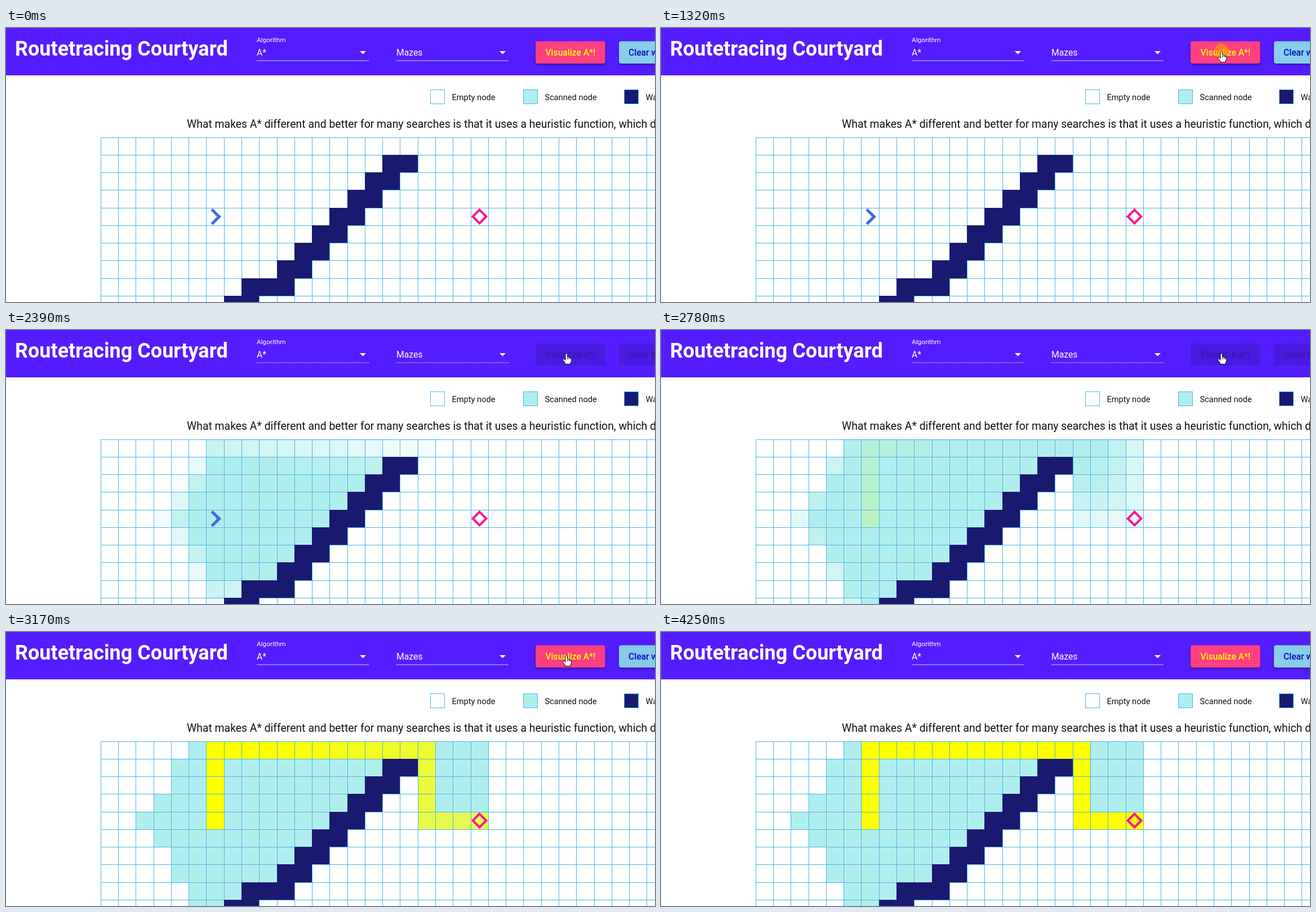
An HTML page with a canvas that plays this animation: 1152 px wide and 486 px high, repeating every 4.78 s.

```html
<!DOCTYPE html>
<html lang="en">
<head>
<meta charset="utf-8">
<title>Routetracing Courtyard</title>
<style>
  html, body { margin: 0; overflow: hidden; background: #fff; }
  canvas { display: block; }
</style>
</head>
<body>
<canvas id="stage" width="1152" height="486"></canvas>
<script>
const ctx = document.getElementById('stage').getContext('2d');
const LOOP = 4780, SCAN = 1490, SCAN_STEP = 11.3, PATH = 2710, PATH_STEP = 9, FADE = 400;
const ENABLE = 2930, SHOW = 380, ARRIVE = 920, PRESS = 1320, LEAVE = 3600, GONE = 4180;
const HEADER = [84, 29, 255], WHITE = [255, 255, 255], SCANNED = [175, 238, 238], YELLOW = [255, 255, 0];
const DISABLED = [74, 26, 224], LINE = '#4db4e6', NAVY = '#191970';

const clamp = v => Math.min(1, Math.max(0, v));
const mix = (a, b, t) => a.map((v, i) => v + (b[i] - v) * t);
const rgb = c => `rgb(${c.map(Math.round)})`;
const gridX = c => Math.floor(168.2 + 31.28 * c);
const gridY = r => Math.floor(194 + 31.28 * r);

const wallStart = r => r === 0 ? 18 : r < 8 ? 17 - r : 16 - r;

// A* with a straight-line heuristic: cells are visited in order of cost + distance.
const scanned = [];
for (let r = 0; r < 10; r++) {
  for (let c = 0; c < 22; c++) {
    const right = c > 17 && r < 5;
    if (!right && c >= wallStart(r)) continue;
    const cost = Math.abs(c - 6) + (right ? 4 + r : Math.abs(r - 4));
    const total = cost + Math.hypot(21 - c, r - 4);
    if (total < 23.001) scanned.push({ r, c, total });
  }
}
scanned.sort((a, b) => a.total - b.total || a.r - b.r);

const route = [];
for (let r = 4; r > 0; r--) route.push([r, 6]);
for (let c = 6; c < 18; c++) route.push([0, c]);
for (let r = 0; r < 4; r++) route.push([r, 18]);
for (let c = 18; c < 22; c++) route.push([4, c]);
const routeIndex = new Map(route.map(([r, c], i) => [r * 100 + c, i]));

const chevron = new Path2D('M366.9 320l-3.5 3.5 11.2 11.2-11.2 11.2 3.5 3.5 15.2-14.7z');
const hand = new Path2D('M-2 2Q-.3-1 1.5 2V7Q3.4 6 4.4 8Q6 7 7 9Q8.8 8.7 8.8 11V14L7 17V19.5H-2.5V17.5L-6.5 12Q-6.6 9.6-4.3 10.4L-2 12.5Z');
const arrow = new Path2D('M0 0V16L3.7 12.6 6.3 18.5 8.7 17.4 6.2 11.7H11.3Z');

function rect(x, y, w, h, color) {
  ctx.fillStyle = color;
  ctx.fillRect(x, y, w, h);
}

function text(str, x, y, size, color, weight = 400) {
  ctx.font = `${weight} ${size}px Roboto, sans-serif`;
  ctx.fillStyle = color;
  ctx.fillText(str, x, y);
}

function select(x, label, disabled) {
  text(label, x, 49, 15.7, '#fff');
  ctx.fillStyle = '#fff';
  ctx.beginPath();
  ctx.moveTo(x + 183, 41);
  ctx.lineTo(x + 194, 41);
  ctx.lineTo(x + 188.5, 46.5);
  ctx.fill();
  ctx.strokeStyle = '#a5e6e8';
  ctx.setLineDash(disabled ? [2.7, 1.4] : []);
  ctx.beginPath();
  ctx.moveTo(x, 58);
  ctx.lineTo(x + 199, 58);
  ctx.lineWidth = 1.2;
  ctx.stroke();
  ctx.setLineDash([]);
}

function button(x, w, label, textX, color, ink, on, disabled) {
  ctx.save();
  ctx.shadowColor = `rgba(0,0,0,${0.4 * on})`;
  ctx.shadowBlur = 4;
  ctx.shadowOffsetY = 2;
  ctx.fillStyle = rgb(mix(DISABLED, color, on));
  ctx.beginPath();
  ctx.roundRect(x, 23.5, w, 39.5, 4);
  ctx.fill();
  ctx.restore();
  text(label, textX, 49, 15.6, disabled ? '#3c16b8' : ink, 500);
}

function header(t) {
  const disabled = t >= SCAN && t < ENABLE;
  const ease = from => 1 - (1 - clamp((t - from) / 400)) ** 4;
  const on = t < ENABLE ? 1 - ease(SCAN) : ease(ENABLE);
  rect(0, 0, 1152, 84, rgb(HEADER));
  text('Routetracing Courtyard', 16, 49, 36, '#fff', 700);
  text('Algorithm', 445, 25, 11.8, '#fff');
  select(445, 'A*', disabled);
  select(693, 'Mazes', disabled);
  button(940, 123.5, 'Visualize A*!', 957.5, [255, 64, 129], '#ff0', on, disabled);
  button(1088, 120, 'Clear walls', 1105, [135, 206, 235], '#0808c8', on, disabled);
}

function legend(x, label, color) {
  rect(x, 109, 26, 26, color);
  ctx.strokeStyle = LINE;
  ctx.lineWidth = 1;
  ctx.strokeRect(x + 0.5, 109.5, 25, 25);
  text(label, x + 38.5, 128, 14.6, '#111');
}

function grid(t) {
  scanned.forEach(({ r, c }, i) => {
    const step = routeIndex.get(r * 100 + c);
    let color = mix(WHITE, SCANNED, clamp((t - SCAN - i * SCAN_STEP) / FADE));
    if (step !== undefined) color = mix(color, YELLOW, clamp((t - PATH - step * PATH_STEP) / FADE));
    rect(gridX(c), gridY(r), 32, 32, rgb(color));
  });
  for (let c = 0; c < 32; c++) rect(gridX(c), 194, 1, 292, LINE);
  for (let r = 0; r < 10; r++) rect(168, gridY(r), 984, 1, LINE);
  for (let r = 1; r < 10; r++) {
    const start = wallStart(r), x = gridX(start), y = gridY(r);
    rect(x, y, gridX(start + (r === 8 ? 3 : 2)) - x, gridY(r + 1) - y, NAVY);
  }
  if (t < PATH) {
    ctx.fillStyle = '#4169e1';
    ctx.fill(chevron);
  }
  ctx.strokeStyle = '#ff1493';
  ctx.lineWidth = 4;
  ctx.beginPath();
  ctx.moveTo(840.5, 322.6);
  ctx.lineTo(852.4, 334.5);
  ctx.lineTo(840.5, 346.4);
  ctx.lineTo(828.6, 334.5);
  ctx.closePath();
  ctx.stroke();
}

function pointer(t) {
  if (t < SHOW || t >= 4250) return;
  const rest = 1 - clamp((t - SHOW) / (ARRIVE - SHOW));
  const u = clamp((t - LEAVE) / (GONE - LEAVE));
  const out = u * u * (3 - 2 * u);
  const x = 995 + 84 * rest ** 1.2 + 129 * out;
  const y = 41 + 385 * rest ** 2 + 429 * out;
  if (t >= PRESS && t < 1480) {
    ctx.fillStyle = 'rgba(255,165,0,.65)';
    ctx.beginPath();
    ctx.arc(x, y, 13, 0, 7);
    ctx.fill();
  }
  const shape = y < 63 && x < 1063 ? hand : arrow;
  ctx.save();
  ctx.translate(x, y);
  ctx.fillStyle = '#fff';
  ctx.strokeStyle = '#111';
  ctx.lineWidth = 1;
  ctx.fill(shape);
  ctx.stroke(shape);
  if (shape === hand) {
    ctx.beginPath();
    for (const k of [1.5, 4.4, 7]) {
      ctx.moveTo(k, 8);
      ctx.lineTo(k, 11);
    }
    ctx.stroke();
  }
  ctx.restore();
}

function draw(now) {
  const t = now % LOOP;
  rect(0, 0, 1152, 486, '#fff');
  header(t);
  legend(753, 'Empty node', '#fff');
  legend(918, 'Scanned node', rgb(SCANNED));
  legend(1097, 'Wall node', NAVY);
  text('What makes A* different and better for many searches is that it uses a heuristic function, which determines', 321, 177, 19.4, '#111');
  grid(t);
  pointer(t);
  requestAnimationFrame(draw);
}
requestAnimationFrame(draw);
</script>
</body>
</html>
```
